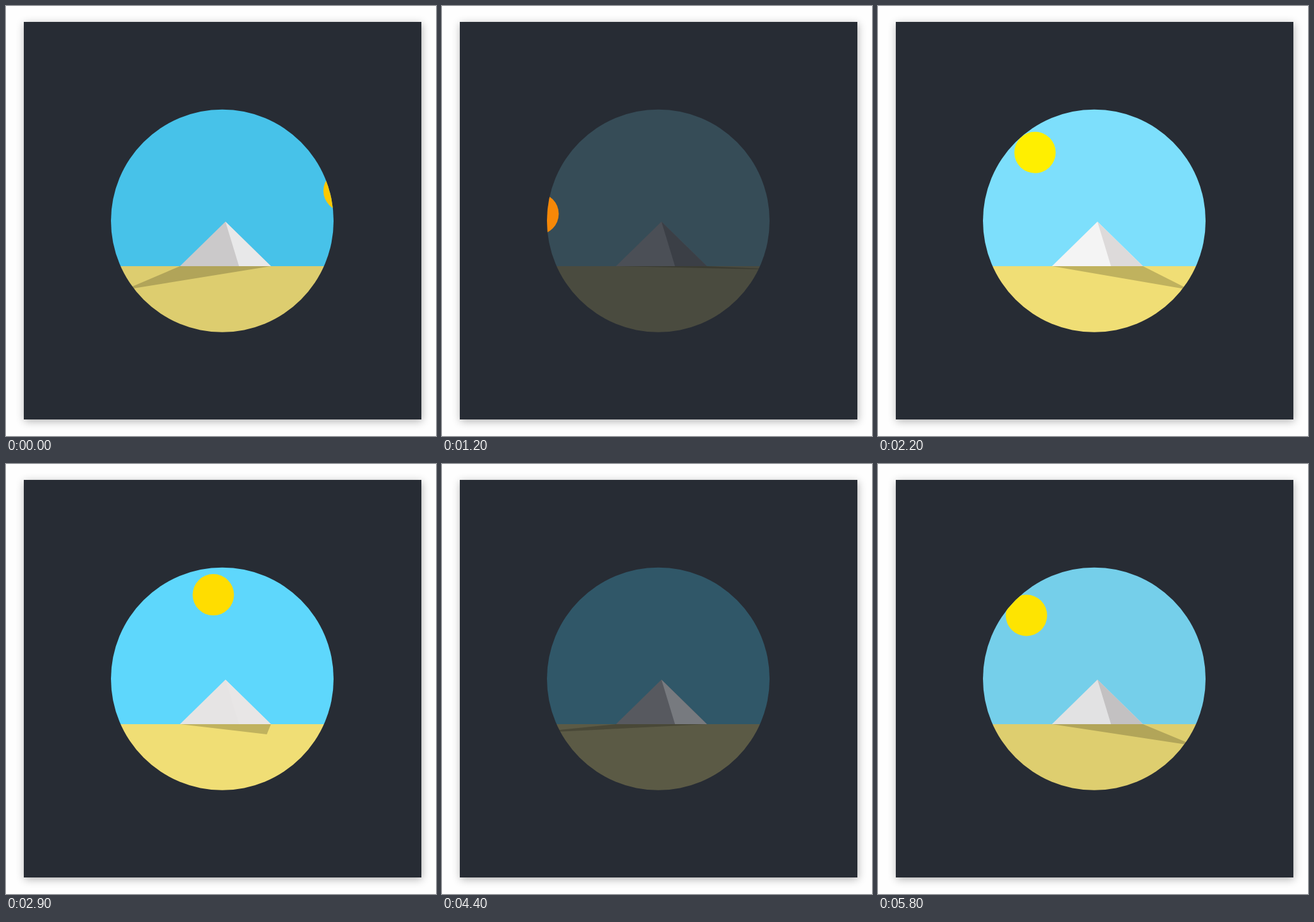
These frames come from a looping animation (676 by 676 pixels, 5.9 s). An HTML page:

```html
<!DOCTYPE html>
<html lang="en">
<head>
<meta charset="utf-8">
<title>Pyramid day and night</title>
<style>
  html, body { margin: 0; width: 100%; height: 100%; overflow: hidden; background: #fefefe; }
  .panel {
    position: absolute; left: 28px; top: 25px; width: 625px; height: 625px;
    background: #272c34; box-shadow: 1.25px 2.5px 12.5px rgba(0, 0, 0, .3);
  }
  svg { position: absolute; left: 0; top: 0; display: block; }
</style>
</head>
<body>
<div class="panel"></div>
<svg width="676" height="676" viewBox="0 0 676 676">
  <clipPath id="disc"><circle cx="340" cy="337.75" r="175"/></clipPath>
  <g clip-path="url(#disc)">
    <rect id="sky" x="160" y="160" width="360" height="249"/>
    <circle id="sun" r="32.5"/>
    <rect id="sand" x="160" y="409" width="360" height="110"/>
    <polygon id="left" points="345,339 416.5,409 273.5,409"/>
    <polygon id="right" points="345,339 416.5,409 366.3,409"/>
    <polygon id="shadow" fill-opacity=".2"/>
  </g>
</svg>
<script>
const LOOP = 5900, FRAME = 100, DAY = 4000;
const MORNING = .3, EVENING = .7;

const parts = Object.fromEntries(
  [...document.querySelectorAll("g > *")].map(node => [node.id, node]));

// cubic-bezier(.4, 0, .49, 1), solved by bisection
function ease(x) {
  let lo = 0, hi = 1;
  for (let i = 0; i < 24; i++) {
    const s = (lo + hi) / 2, r = 1 - s;
    if (1.2 * s * r * r + 1.47 * s * s * r + s * s * s < x) lo = s; else hi = s;
  }
  return lo * lo * (3 - 2 * lo);
}

const mix = (a, b, k) => a + (b - a) * k;

// Eases from 0 to 1 while p runs from one share of the day to another.
const rise = (p, from, to) =>
  ease(Math.min(1, Math.max(0, (p - from) / (to - from))));

// Swings from the dawn value to the morning one, then on to dusk.
const swing = (p, dawn, morning, dusk) =>
  mix(mix(dawn, morning, rise(p, 0, MORNING)), dusk, rise(p, MORNING, 1));

const channels = hex => [1, 3, 5].map(i => parseInt(hex.slice(i, i + 2), 16));

function paint(id, p, morning, evening, night = "#272c34") {
  const [n, m, e] = [night, morning, evening].map(channels);
  const up = rise(p, 0, MORNING), turn = rise(p, MORNING, EVENING), down = rise(p, EVENING, 1);
  const rgb = n.map((v, i) =>
    Math.round(mix(mix(mix(v, m[i], up), e[i], turn), v, down)));
  parts[id].setAttribute("fill", `rgb(${rgb})`);
}

// The day advances slightly more than a frame each time and rests every 16th.
function dayShare(frame) {
  const steps = frame - Math.max(0, Math.floor((frame - 1) / 16));
  return (3042 + steps * FRAME * 16 / 15) % DAY / DAY;
}

function draw(p) {
  paint("sky", p, "#7ddffc", "#4ad2fc");
  paint("sand", p, "#f0de75", "#f0de75");
  paint("sun", p, "#ffef00", "#ffd100", "#f57209");
  paint("left", p, "#f4f4f4", "#dddada");
  paint("right", 1 - p, "#f4f4f4", "#dddada");

  const angle = swing(p, -70, -28, 70) * Math.PI / 180;
  parts.sun.setAttribute("cx", 353 + 227.5 * Math.sin(angle));
  parts.sun.setAttribute("cy", 431.5 - 227.5 * Math.cos(angle));

  // Long at morning and evening, short at noon, flat at night.
  const length = rise(p, 0, .3) - .6 * rise(p, .3, .55) + .6 * rise(p, .55, .75) - rise(p, .75, 1);
  const tip = [swing(p, 582, 491, 116), 409 + 37.5 * length];
  parts.shadow.setAttribute("points", `273.5,409 416.5,409 ${tip}`);
}

const start = performance.now();
function tick() {
  const t = (performance.now() - start) % LOOP;
  draw(dayShare(Math.floor(t / FRAME)));
  requestAnimationFrame(tick);
}
tick();
</script>
</body>
</html>
```
